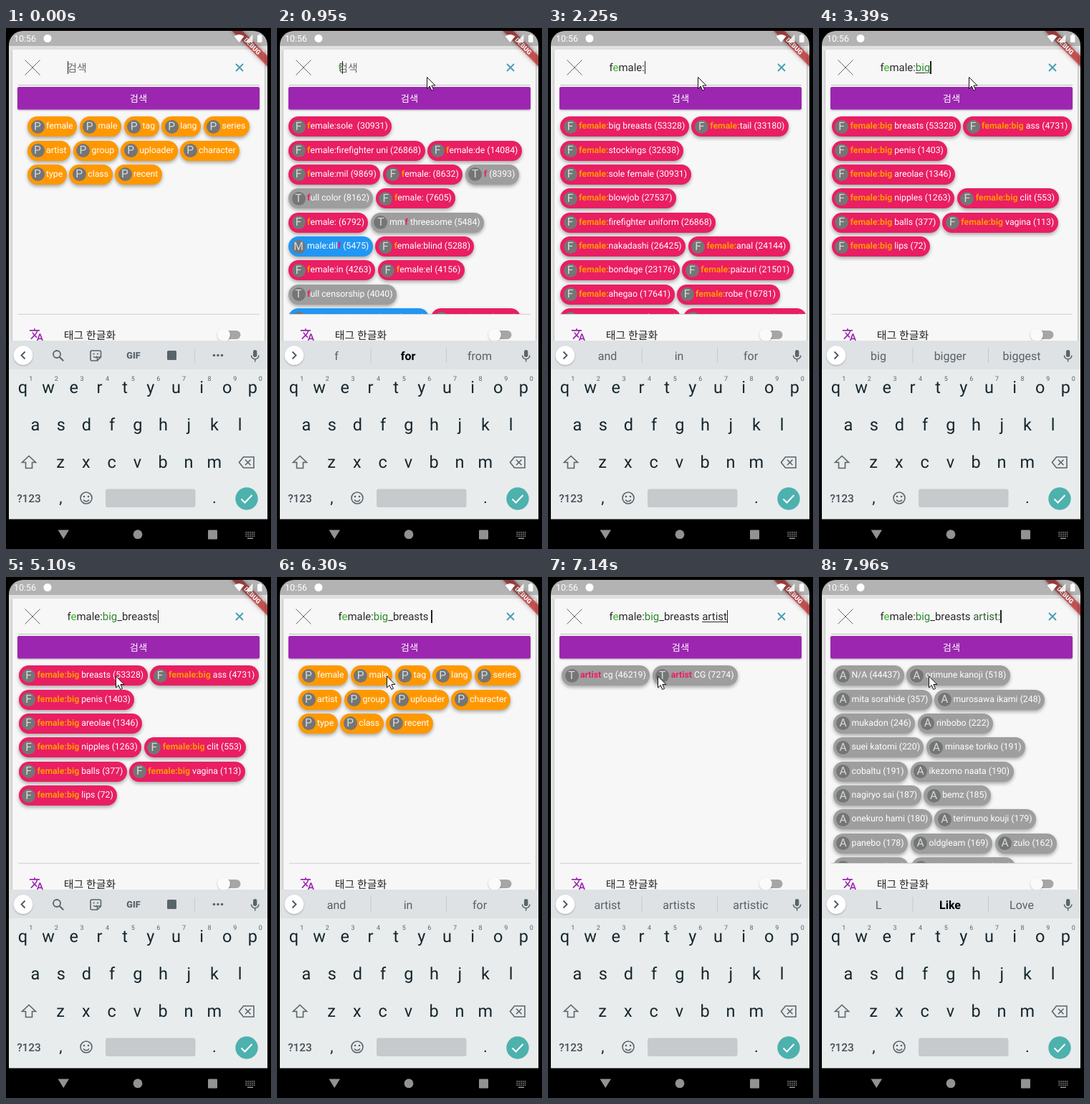
Recreate the animation shown at these times as an HTML page. Size 370 by 725 pixels, loop 8000 ms.

```html
<!DOCTYPE html>
<html lang="ko">
<head>
<meta charset="utf-8">
<title>Tag search</title>
<style>
html, body { margin: 0; width: 100%; height: 100%; overflow: hidden; background: #000; }
#stage { position: relative; width: 370px; height: 725px; overflow: hidden; font-family: Roboto, "Noto Sans CJK KR", "Noto Sans CJK", sans-serif; text-rendering: geometricPrecision; }
svg { position: absolute; left: 0; top: 0; display: block; }
svg text { font-family: Roboto, "Noto Sans CJK KR", "Noto Sans CJK", sans-serif; }
#chips { position: absolute; left: 9px; top: 117px; width: 352px; height: 281px; overflow: hidden; }
.row { position: absolute; display: flex; gap: 3.5px; }
.chip { position: relative; display: flex; align-items: center; height: 28px; padding: 0 5.5px 0 4.5px; border-radius: 14px; color: #fff; font-size: 12.29px; white-space: pre; box-shadow: 0 2.5px 5px rgba(0,0,0,.33); overflow: hidden; }
.avatar { width: 19px; height: 19px; line-height: 19px; margin-right: 2.5px; border-radius: 50%; background: #757575; color: #d0dde4; font-size: 15.6px; text-align: center; }
.chip b { font-weight: 700; }
#ripple { position: absolute; border-radius: 50%; background: #fff; }
#field { position: absolute; left: 85.5px; top: 46px; height: 19px; line-height: 19px; font-size: 14.93px; white-space: pre; color: #2b2b2b; }
#field u { text-underline-offset: 2px; text-decoration-thickness: 1px; }
#caret { display: inline-block; width: 1.5px; height: 18px; margin-right: -2px; vertical-align: top; background: #222; }
</style>
</head>
<body>
<div id="stage">
<svg id="base" width="370" height="725"></svg>
<div id="chips"></div>
<div id="field"><span id="typed"></span><i id="caret"></i></div>
<svg id="pointer" width="370" height="725"><path id="arrow" d="M.5 .5v16l3.7-3.5 2.6 6 2.7-1.2-2.6-5.8h5z" fill="#fff" stroke="#111"/></svg>
</div>
<script>
const LOOP = 8000;
const $ = id => document.getElementById(id);
const text = (x, y, s, size, fill, extra = '') =>
  `<text x="${x}" y="${y}" font-size="${size}" fill="${fill}" text-anchor="middle" ${extra}>${s}</text>`;
const rect = (x, y, w, h, fill, r = 0, extra = '') =>
  `<rect x="${x}" y="${y}" width="${w}" height="${h}" rx="${r}" fill="${fill}" ${extra}/>`;
const circle = (x, y, r, fill, extra = '') => `<circle cx="${x}" cy="${y}" r="${r}" fill="${fill}" ${extra}/>`;
const line = (d, color, width = 1.6) => `<path d="${d}" fill="none" stroke="${color}" stroke-width="${width}"/>`;
const shape = (d, fill, extra = '') => `<path d="${d}" fill="${fill}" ${extra}/>`;

const INK = '#17262d', ICON = '#59646a';

function ribbon() {
  return `<g transform="translate(343.9 25.1) rotate(45)">${rect(-35, -5.3, 70, 10.6, '#b71c1c', 0, 'fill-opacity=".66" filter="url(#glow)"')}${text(0, 3.2, 'DEBUG', 9, '#fff', 'font-weight="900"')}</g>`;
}

// The system bar shades whatever the app paints below it.
function statusBar() {
  return rect(4, 4, 361, 21, '#000', 0, 'opacity=".2"') +
    text(26.5, 19, '10:56', 12.4, '#fff') + circle(58, 14.5, 5.5, '#fff') +
    shape('M318.5 11.5q7-5 14 0l-7 8.5z', '#fff') + shape('M334 20h10.5v-11z', '#fff', 'opacity=".85"') +
    rect(351, 10, 6.5, 10, '#fff', 1) + rect(353, 8.7, 2.5, 2, '#fff');
}

function searchPanel() {
  const translate = 'M12.87 15.07l-2.54-2.51.03-.03c1.74-1.94 2.98-4.17 3.71-6.53H17V4h-7V2H8v2H1v2h11.17C11.5 7.92 10.44 9.75 9 11.35 8.07 10.32 7.3 9.19 6.69 8h-2c.73 1.63 1.73 3.17 2.98 4.56l-5.09 5.02L4 19l5-5 3.11 3.11zM18.5 10h-2L12 22h2l1.12-3h4.75L21 22h2zm-2.62 7l1.62-4.33L19.12 17z';
  return rect(9, 30, 352, 420, '#f7f7f7', 2, 'filter="url(#soft)"') +
    line('M26.5 44.5l21 21M47.5 44.5l-21 21', '#666', 1) + line('M321 50l10 10M331 50l-10 10', '#459db5', 1.8) +
    rect(17, 79, 337, 1, '#bdbdbd') + rect(16, 82, 338, 31.5, '#9c27b0', 2, 'filter="url(#soft)"') +
    text(185, 102.7, '검색', 13.2, '#fff', 'font-weight="500"') +
    `<g id="hint">${text(99, 60.5, '검색', 14.93, '#6b6b6b')}</g>` +
    rect(17, 397.8, 337, 1, '#cfcfcf') +
    shape(translate, '#9c27b0', 'transform="translate(32 416.5) scale(.878)"') +
    text(117, 432.5, '태그 한글화', 14.93, '#222') +
    rect(300, 421, 27.5, 12, '#a6a6a6', 6) + circle(304, 427, 8.8, '#fafafa', 'filter="url(#soft)"');
}

function keyboard() {
  const keyRow = (keys, x0, step, y) => [...keys].map((k, i) => text(x0 + i * step, y, k, 23.5, INK)).join('');
  const digits = [...'1234567890'].map((d, i) => text(34.7 + i * 35.62, 490.5, d, 9, ICON)).join('');
  return rect(4, 435, 361, 40, '#dee2e5') + rect(4, 475, 361, 210, '#e8eced') +
    `<g id="strip"></g>` +
    rect(345, 448, 5.4, 10, ICON, 2.7) + line('M342.5 455.5a5.2 5.2 0 0 0 10.4 0M347.7 460.5v4', ICON, 1.5) +
    keyRow('qwertyuiop', 23.5, 35.65, 508) + digits + keyRow('asdfghjkl', 41, 35.7, 559.5) +
    keyRow('zxcvbnm', 76, 35.8, 611.5) +
    line('M32 595.5l-9.5 9h5v8h9v-8h5z', ICON) +
    line('M331.5 597h14.5v15h-14.5l-6-7.5zM334 600.7l7.5 7.5M341.5 600.7l-7.5 7.5', ICON) +
    text(32, 660, '?123', 15.4, '#465158', 'font-weight="500"') + text(76.5, 660.5, ',', 22, INK) +
    circle(112, 654, 8, 'none', `stroke="${ICON}" stroke-width="1.6"`) +
    circle(109, 652, 1.3, ICON) + circle(115, 652, 1.3, ICON) + line('M108 656.5q4 4.5 8 0', ICON) +
    rect(139, 641.5, 125.5, 25.5, '#c6cacc', 3) + text(291, 660.5, '.', 22, INK) +
    circle(336, 655, 15.7, '#4db1ae') + line('M328.5 655.5l5 5 10-10.5', '#fff', 2);
}

function navBar() {
  const gray = '#929292';
  let dots = '';
  for (let i = 0; i < 15; i++) dots += rect(334.5 + (i % 5) * 2.8, 701 + Math.floor(i / 5) * 2.7, 1.6, 1.5, gray);
  return rect(4, 683.5, 361, 41.5, '#000') + shape('M72.5 698.5h15.5l-7.75 12.5z', gray) + circle(184, 704.7, 6.4, gray) +
    rect(282, 698.5, 13, 13, gray, 1) + dots + rect(337, 709.5, 8, 1.5, gray);
}

$('base').innerHTML = `<defs><clipPath id="screen"><path d="M4 684V24A20 20 0 0 1 24 4H345A20 20 0 0 1 365 24V684z"/></clipPath>
  <filter id="soft" x="-20%" y="-20%" width="140%" height="150%"><feDropShadow dx="0" dy="1" stdDeviation="1" flood-opacity=".3"/></filter>
  <filter id="glow" x="-20%" y="-100%" width="140%" height="300%"><feDropShadow dx="0" dy="0" stdDeviation="3" flood-opacity=".5"/></filter></defs>
  ${rect(0, 0, 370, 725, '#000')}<g clip-path="url(#screen)">${rect(4, 4, 361, 680, '#e0e0e0')}${searchPanel()}${ribbon()}${statusBar()}${keyboard()}</g>${navBar()}`;

// Lists: left edge, then rows split by "|", chips by ","; the first letter of a chip is its avatar.
const LISTS = {
  prefixes: [30, 'Pfemale,Pmale,Ptag,Plang,Pseries|Partist,Pgroup,Puploader,Pcharacter|Ptype,Pclass,Precent'],
  f: [16, 'Ffemale:sole  (30931)|Ffemale:firefighter uni (26868),Ffemale:de (14084)|Ffemale:mil (9869),Ffemale: (8632),Tf (8393)|Tfull color (8162),Ffemale: (7605)|Ffemale: (6792),Tmmf threesome (5484)|Mmale:dilf (5475),Ffemale:blind (5288)|Ffemale:in (4263),Ffemale:el (4156)|Tfull censorship (4040)|Mmale:firm dark uniform (3904),Ffemale:co (3871)'],
  fe: [18, 'Ffemale:sole  (30931)|Ffemale:firefighter uni (26868),Ffemale:de (14084)|Ffemale:mil (9869),Ffemale: (8632)|Ffemale: (7605),Ffemale: (6792)|Ffemale:blind (5288),Ffemale:in (4263)|Ffemale:el (4156),Ffemale:co (3871)|Ffemale:dark (3650),Ffemale:ha (3502)|Ffemale:sw (3317),Ffemale:ki (3194)|Ffemale:glasses (3011)'],
  female: [17, 'Ffemale:big breasts (53328),Ffemale:tail (33180)|Ffemale:stockings (32638)|Ffemale:sole female (30931)|Ffemale:blowjob (27537)|Ffemale:firefighter uniform (26868)|Ffemale:nakadashi (26425),Ffemale:anal (24144)|Ffemale:bondage (23176),Ffemale:paizuri (21501)|Ffemale:ahegao (17641),Ffemale:robe (16781)|Ffemale:swimsuit (15930),Ffemale:stockings (14822)'],
  b: [17, 'Ffemale:big breasts (53328)|Ffemale:blowjob (27537)|Ffemale:bondage (23176)|Ffemale:bikini (9216),Ffemale:bbw (5310)|Ffemale:blindfold (5288)|Ffemale:big ass (4731)|Ffemale:beauty mark (1791)|Ffemale:big penis (1403)|Ffemale:big areolae (1346)'],
  big: [17.5, 'Ffemale:big breasts (53328),Ffemale:big ass (4731)|Ffemale:big penis (1403)|Ffemale:big areolae (1346)|Ffemale:big nipples (1263),Ffemale:big clit (553)|Ffemale:big balls (377),Ffemale:big vagina (113)|Ffemale:big lips (72)'],
  ar: [19, 'Tartist cg (46219),Ffemale:netorare (8844)|Ffemale:dark skin (8547),Mmale:dark skin (7828)|Ffemale:futanari (7605),Tartist CG (7274)|Ffemale:collar (7155),Tvariant set (4207)|Uhumbarnwork (4069),Ffemale:garter belt (3917)|Ffemale:harem (3194),Tstory arc (2613)|Ffemale:shibari (2356),Ffemale:gyaru (2169)|Ffemale:leotard (1999),Ffemale:beauty mark (1791)|Mmale:collar (1702),Ffemale:bar (1655)'],
  art: [19, 'Tartist cg (46219),Tartist CG (7274)|Ffemale:garter belt (3917)|Ffemale:part (1418),Tart book (1203)|Mmale:garter belt (611)'],
  artist: [19, 'Tartist cg (46219),Tartist CG (7274)'],
  names: [19.5, 'AN/A (44437),Aorimune kanoji (518)|Amita sorahide (357),Amurosawa ikami (248)|Amukadon (246),Arinbobo (222)|Asuei katomi (220),Aminase toriko (191)|Acobaltu (191),Aikezomo naata (190)|Anagiryo sai (187),Abemz (185)|Aonekuro hami (180),Aterimuno kouji (179)|Apanebo (178),Aoldgleam (169),Azulo (162)|Ahoruma (160),Asedori menako (158)'],
  namesL: [19.5, 'Acobaltu (191),Aoldgleam (169)|Azulo (162),Amelkoro nabi (141)|Apalumo (133),Ahelmori teko (128)|Asolbemi (120),Akelluno (117)|Ablumeno tai (109),Atolmaru (104)|Aviloke (98),Anulbemo kaisa (95)|Aglomeru (92),Apelnuko (90)|Arilmoto (87),Adolkemu hana (85)|Asalkobe (82),Ayolmena (80)']
};
const COLORS = { F: '#e91e63', M: '#2196f3', P: '#ff9800' };

// [start, finished text, word being composed, list, highlighted query, suggestions]
const BIG = 'female:big_breasts ';
const STATES = [
  [0, '', '', 'prefixes', '', ''],
  [820, '', 'f', 'prefixes', '', ''],
  [900, '', 'f', 'f', 'f', 'f,*for,from'],
  [1230, '', 'fe', 'f', 'fe', 'f,*for,from'],
  [1310, '', 'fe', 'fe', 'fe', 'fe,*few,feet'],
  [1530, '', 'fem', 'fe', 'fem', 'fem,*fem,female'],
  [1680, '', 'fema', 'fe', 'fema', 'fema,*female,females'],
  [1830, '', 'femal', 'fe', 'femal', 'femal,*female,females'],
  [2140, '', 'female', 'fe', 'female', 'female,females,femme'],
  [2250, 'female:', '', 'female', 'female:', 'and,in,for'],
  [3140, 'female:', 'b', 'b', 'female:b', 'b,*be,but'],
  [3260, 'female:', 'bi', 'big', 'female:bi', 'bi,*bit,bid'],
  [3390, 'female:', 'big', 'big', 'female:big', 'big,bigger,biggest'],
  [4950, BIG.trim(), '', 'big', 'female:big', 'big,bigger,biggest'],
  [5050, BIG.trim(), '', 'big', 'female:big', ''],
  [5350, BIG, '', 'prefixes', '', ''],
  [5470, BIG, '', 'prefixes', '', 'and,in,for'],
  [6500, BIG, 'a', 'ar', 'a', 'a,*and,are'],
  [6680, BIG, 'ar', 'ar', 'ar', 'ar,*are,around'],
  [6800, BIG, 'art', 'art', 'art', 'art,arts,article'],
  [6920, BIG, 'arti', 'artist', 'arti', 'arti,*artist,article'],
  [7030, BIG, 'artis', 'artist', 'artis', 'artis,*artist,artists'],
  [7140, BIG, 'artist', 'artist', 'artist', 'artist,artists,artistic'],
  [7300, BIG + 'artist:', '', 'names', '', 'and,in,for'],
  [7420, BIG + 'artist:', 'L', 'namesL', 'l', 'L,*Like,Love'],
  [7960, BIG + 'artist:', '', 'names', '', 'L,*Like,Love']
];
const CARET_OFF = [[400, 820], [2650, 3140], [3880, 4340], [5810, 6300], [7800, 7960]];

function chipHtml(item, query) {
  const kind = item[0], label = item.slice(1);
  const mark = kind === 'F' ? '#ff9800' : '#e91e63';
  const body = query ? label.replace(query, `<b style="color:${mark}">${query}</b>`) : label;
  return `<div class="chip" style="background:${COLORS[kind] || '#9e9e9e'}"><span class="avatar">${kind}</span><span>${body}</span></div>`;
}

function drawChips(name, query) {
  const [left, rows] = LISTS[name];
  $('chips').innerHTML = rows.split('|').map((row, i) =>
    `<div class="row" style="left:${left - 9}px;top:${6.2 + i * 33.36}px">${row.split(',').map(c => chipHtml(c, query)).join('')}</div>`).join('');
  if (name === 'big') document.querySelector('.chip').insertAdjacentHTML('beforeend', '<i id="ripple"></i>');
}

function drawStrip(words) {
  const arrow = words ? 'M21.5 450.5l5 5-5 5' : 'M26.5 450.5l-5 5 5 5';
  let s = circle(24, 455.5, 13.2, '#fff', 'filter="url(#soft)"') + line(arrow, '#4a555b', 1.8);
  if (words) {
    s += rect(130.5, 445, 1, 21, '#c4c9cc') + rect(236, 445, 1, 21, '#c4c9cc');
    words.split(',').forEach((w, i) => {
      const bold = w[0] === '*';
      s += text(83 + i * 100, 461.5, w.replace('*', ''), 16, bold ? '#000' : '#566067', bold ? 'font-weight="700"' : '');
    });
  } else {
    s += circle(71, 454, 5, 'none', `stroke="${ICON}" stroke-width="1.8"`) + line('M74.7 457.7l5.5 5.5', ICON, 2) +
      line('M120 449h10.5q2 0 2 2v7l-5 5h-7.5q-2 0-2-2v-10q0-2 2-2zM127.5 463v-5h5M122 457q3 3 5 0', ICON) +
      circle(122.5, 453.5, 1.1, ICON) + circle(128, 453.5, 1.1, ICON) +
      text(178, 459.5, 'GIF', 12.6, ICON, 'font-weight="900"') + rect(225, 449, 13, 13, ICON, 1.5) +
      rect(263, 446, 1, 20, '#c4c9cc') + [290.5, 296, 301.5].map(x => circle(x, 455.5, 1.8, ICON)).join('');
  }
  $('strip').innerHTML = s;
}

const tint = (s, word, color) => s.replace(word, `<span style="color:${color}">${word}</span>`);

function drawTyped(done, word) {
  if (word === 'f') return tint(word, 'f', '#3c9a3c');
  const s = done + (word && `<u>${word}</u>`);
  if (!done) return s;
  const green = s.replace('female', 'f<span style="color:#35b52b">e</span>male');
  return tint(tint(green, 'big', '#2d8a2d'), 'artist:', '#2f6332');
}

const clamp01 = v => Math.max(0, Math.min(1, v));
const ease = v => v * v * (3 - 2 * v);
const mix = (a, b, k) => a + (b - a) * k;
let shown = -1;

function render(t) {
  const index = STATES.findLastIndex(s => s[0] <= t);
  if (index !== shown) {
    const [, done, word, list, query, words] = STATES[index];
    drawChips(list, query);
    drawStrip(words);
    $('typed').innerHTML = drawTyped(done, word);
    shown = index;
  }
  $('hint').style.opacity = t < 970 ? 1 : 0;
  $('caret').style.opacity = CARET_OFF.some(([a, b]) => t >= a && t < b) ? 0 : 1;

  const enter = ease(clamp01((t - 10) / 210)), move = ease(clamp01((t - 4300) / 270));
  const x = mix(mix(299, 209, enter), 153, move), y = mix(mix(692, 68, enter), 137.5, move);
  $('arrow').setAttribute('transform', `translate(${x} ${y})`);
  $('arrow').style.opacity = t < 20 ? 0 : 1;

  const ripple = $('ripple');
  if (ripple) {
    const r = mix(8, 150, clamp01((t - 4770) / 300));
    ripple.style.cssText = `left:${135.5 - r}px;top:${14 - r}px;width:${2 * r}px;height:${2 * r}px;opacity:${t < 4770 ? 0 : .2 * clamp01((5090 - t) / 150)}`;
  }
}

const start = performance.now();
function tick() {
  render((performance.now() - start) % LOOP);
  requestAnimationFrame(tick);
}
render(0);
requestAnimationFrame(tick);
</script>
</body>
</html>
```
